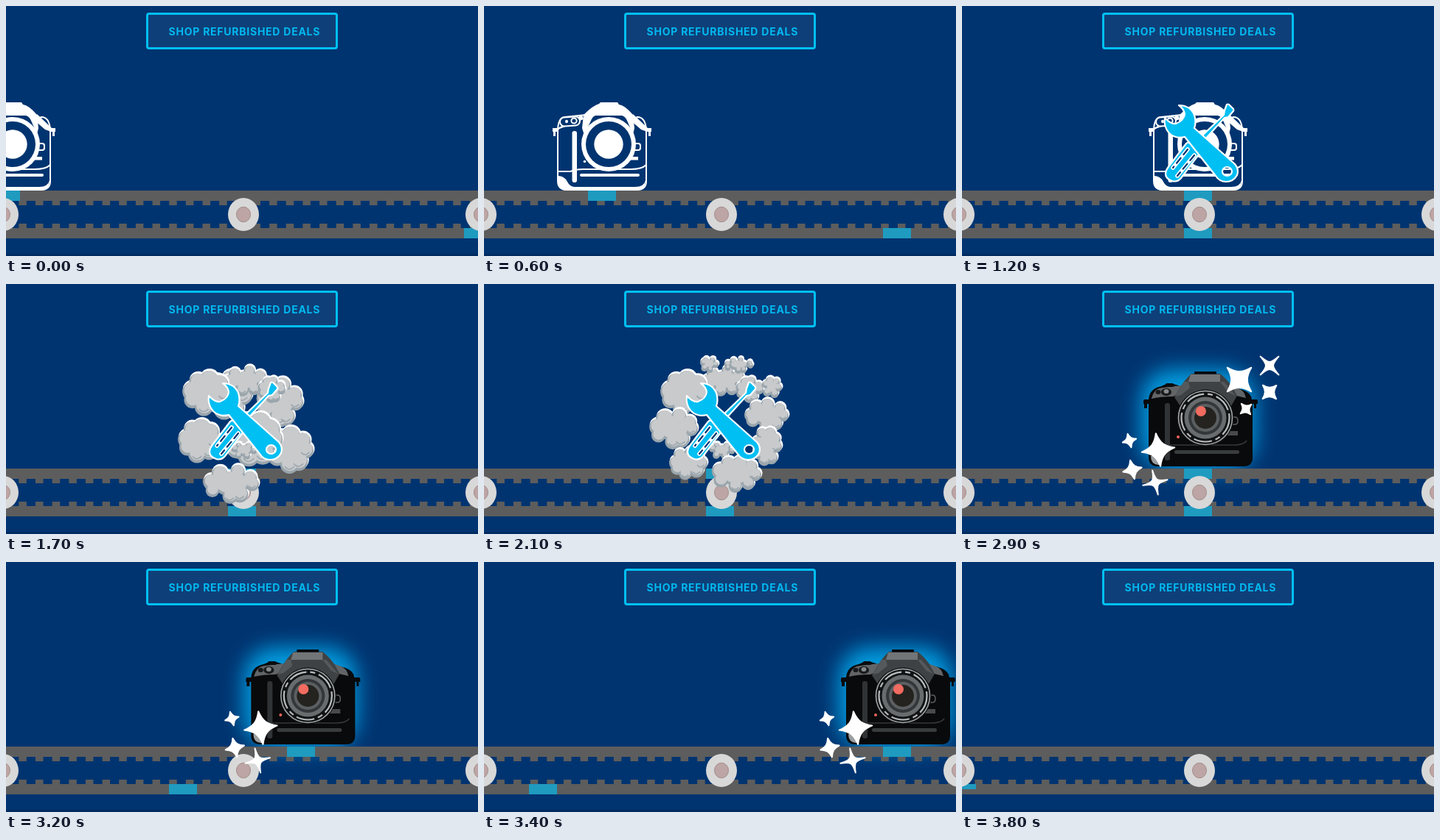
An HTML page for the animation above (4 s loop, 640x340 px).

```html
<!DOCTYPE html>
<html lang="en">
<head>
<meta charset="utf-8">
<title>Refurbished deals</title>
<style>
html, body { margin: 0; width: 100%; height: 100%; overflow: hidden; background: #003470; }
svg { display: block; width: 640px; height: 340px; }
.label { font: 700 14px Inter, Roboto, sans-serif; letter-spacing: .75px; fill: #00b9f0; }
.line { fill: none; stroke: #fff; stroke-width: 2; }
.tool { fill: #00bff3; stroke: #fff; stroke-width: 2.2; stroke-linejoin: round; }
.navy { fill: #003470; }
</style>
</head>
<body>
<svg viewBox="0 0 640 340">
  <defs>
    <filter id="blur" x="-50%" y="-50%" width="200%" height="200%"><feGaussianBlur stdDeviation="14"/></filter>
  </defs>
  <rect class="navy" width="640" height="340"/>
  <rect y="337" width="640" height="3" fill="#002b61"/>
  <rect x="191.5" y="10.5" width="257" height="47" rx="2.5" fill="#0f3f78" stroke="#00c0f3" stroke-width="3"/>
  <text class="label" x="323.4" y="39.6" text-anchor="middle">SHOP REFURBISHED DEALS</text>

  <!-- worn camera, drawn around x = 160 -->
  <g id="oldCam">
    <path class="line" d="M100 171V238Q100 250 113 250H207Q220 250 220 238V169Q219 151 208 151L200 154M100 171Q100 151 110 151L138 148"/>
    <path fill="#fff" d="M100 231Q109 231 113 239Q116 245 122 246H205Q217 246 219 237Q219 251 207 251H113Q100 251 100 238Z"/>
    <path class="line" stroke-width="1.5" d="M100 225H117Q124 222 134 222H199Q214 222 220 216"/>
    <path fill="#fff" d="M93 166h7l33-18 2 6-27 11q-8 2-8 6h-3v6h-3v-6h-1zM227 166h-5l-20-19-3 9 14 12q8 3 8 3h2v6h3v-6h1z"/>
    <path fill="#fff" d="M156 133l2-2h23l2 3q8 1 19 14l2 18-6 26h-57l-8-26 2-18q13-13 21-15z"/>
    <path class="navy" d="M151 149h36q5 1 8 9l7 17-4 20h-58l-4-20 8-17q3-8 7-9z"/>
    <rect x="103" y="151" width="27" height="12" rx="6" class="line navy" transform="rotate(-4 116 157)"/>
    <ellipse cx="112" cy="157" rx="2" ry="2.3" fill="#fff"/>
    <circle cx="122" cy="156" r="3.6" class="line"/>
    <circle cx="169" cy="188" r="37" fill="#fff"/>
    <circle cx="169" cy="188" r="31" class="navy"/>
    <circle cx="169" cy="188" r="19.7" fill="#fff"/>
    <rect x="119.5" y="170" width="6.5" height="70" rx="3" fill="#fff"/>
    <rect x="130" y="228" width="81" height="4" rx="2" fill="#fff"/>
    <path class="line" stroke-width="1.5" d="M204 187h5q3 0 3 3v3q0 3-3 3h-5"/>
    <path fill="#fff" d="M200 205h9v4.500h-12z"/>
    <circle cx="136.500" cy="211.500" r="1.800" fill="#fff"/>
  </g>

  <!-- renewed camera, drawn around x = 320 -->
  <g id="newCam">
    <rect id="glow" x="243" y="116" width="154" height="137" rx="42" fill="#00a8ec" opacity=".9" filter="url(#blur)"/>
    <path fill="#090a0b" d="M246 159q0-2 2-2h5q1-15 17-18l7-3h10l10 3h67l17 5q11 4 12 13h6q2 0 2 2v4h-2v6h-3v-6h-2v73q0 12-12 12H266q-13 0-13-12v-73h-2v6h-4v-6h-1z"/>
    <path fill="#626567" d="M257 156q3-14 15-15l25-3 6 8-17 7q-17 0-29 3zM358 136l17 6q8 3 10 13l-17-4z"/>
    <ellipse cx="266" cy="147" rx="3.500" ry="3" fill="#17191a"/>
    <ellipse cx="277" cy="147" rx="7" ry="5" fill="#17191a"/>
    <ellipse cx="277" cy="146" rx="3.500" ry="3" fill="#85898b"/>
    <rect x="276" y="135" width="11" height="5" rx="1.500" fill="#0c0d0e"/>
    <path fill="#3f4244" d="M311 122h39q9 7 16 17l7 13-8 14h-69l-8-12 7-12q7-12 16-20z"/>
    <path fill="#727577" d="M310 123h40v10h-43z"/>
    <path fill="#55595b" d="M307 133h-6l-12 20 8-2 12-10zM350 133h5l16 19-9-4z"/>
    <rect x="315" y="119" width="30" height="3.500" rx="1" fill="#060708"/>
    <rect x="275" y="162" width="7" height="78" rx="3" fill="#303335"/>
    <path fill="none" stroke="#35383a" stroke-width="1.500" d="M254 220h22q8-1 13-1h79q14 0 18-6"/>
    <rect x="288" y="226" width="88" height="5" rx="2.500" fill="#393c3e"/>
    <path fill="#484b4d" d="M363 200h11v6h-15z"/>
    <path fill="none" stroke="#5c6062" stroke-width="1.500" d="M364 181h6q4 0 4 5t-4 5h-6"/>
    <path fill="#9b9fa1" d="M256 234q8-1 11 6l3 6h-4q-10-1-10-12z"/>
    <circle cx="293" cy="208" r="2" fill="#ef655c"/>
    <circle cx="330" cy="182" r="38.500" fill="#111314"/>
    <circle cx="330" cy="182" r="36.500" fill="none" stroke="#a7abad" stroke-width="1.500"/>
    <circle cx="330" cy="182" r="32.500" fill="none" stroke="#b9bdbf" stroke-width="2.200" stroke-dasharray="25 5 7 5"/>
    <circle cx="330" cy="182" r="28.500" fill="#686c6e"/>
    <circle cx="330" cy="182" r="23" fill="#343739"/>
    <circle cx="330" cy="182" r="19" fill="#5b5f61"/>
    <circle cx="330" cy="182" r="15" fill="#25231f"/>
    <circle cx="324" cy="173" r="7" fill="#f26b60"/>
  </g>

  <g id="belt"></g>
  <rect id="padTop" y="251" width="38" height="14" fill="#1f9bc0"/>
  <rect id="padLow" y="302" width="38" height="14" fill="#1f9bc0"/>
  <g id="rollers"></g>

  <g id="smokeA"></g>
  <g id="smokeB"></g>
  <g id="smokeC"></g>

  <g id="tools">
    <path class="tool" d="M356 142l3-8q1-1 3 0l6 6q1 2-1 4l-6 7-5 1-28 31-5-4 32-31z"/>
    <path class="tool" d="M304 187q3-3 7 0l9 8q3 3 1 7l-24 32q-5 6-12 4-9-3-9-10 0-4 3-8z"/>
    <g fill="none" stroke-linecap="round">
      <path id="slots" stroke="#fff" stroke-width="5.500" d="M306 195l-20 25M315 203l-23 28"/>
      <path stroke="#003470" stroke-width="2.200" stroke-dasharray="9 6" d="M306 195l-20 25M315 203l-23 28"/>
    </g>
    <path class="tool" fill-rule="evenodd" d="M294 135Q309 135 315 148Q318 158 315 166L370 215Q376 222 373 230Q368 239 358 239Q349 239 344 231L302 178Q289 181 281 173Q273 164 275 152Q283 161 290 160Q301 156 302 147Q301 140 294 135ZM353 225a6.500 6 0 1 0 13 0a6.500 6 0 1 0 -13 0Z"/>
  </g>

  <g id="starsR" fill="#fff"></g>
  <g id="starsL" fill="#fff"></g>
</svg>
<script>
const $ = id => document.getElementById(id);
const show = (id, on) => $(id).setAttribute('visibility', on ? 'visible' : 'hidden');
const move = (id, dx) => $(id).setAttribute('transform', `translate(${dx} 0)`);
const rect = (x, y, w, h) => `<rect x="${x}" y="${y}" width="${w}" height="${h}"/>`;

function belt() {
  let s = rect(0, 251, 640, 14) + rect(0, 302, 640, 14);
  for (let x = 40 - 2 * 22.65; x < 640; x += 22.65) {
    s += rect(x, 264, 10.5, 7) + rect(x, 296, 10.5, 7);
  }
  return `<g fill="#5d5d5d">${s}</g>`;
}

const roller = x =>
  `<ellipse cx="${x}" cy="283.500" rx="21" ry="22.500" fill="#d8d8d8"/>
   <ellipse cx="${x}" cy="283.500" rx="9.500" ry="10.300" fill="#bca5a4" stroke="#a38c8c"/>`;

function random(seed) {
  return () => (seed = seed * 16807 % 2147483647) / 2147483647;
}

// Billowing cloud: lobes around an ellipse in white, shade and light layers.
function cloud([x, y, rx, ry], i) {
  const rnd = random(977 * (i + 3));
  const n = rx > 18 ? 8 : 6, lobes = [[x, y, rx * .62, ry * .62]];
  for (let k = 0; k < n; k++) {
    const a = (k + rnd() * .5) / n * 2 * Math.PI, r = Math.min(rx, ry) * (.34 + rnd() * .1);
    lobes.push([x + Math.cos(a) * (rx - r), y + Math.sin(a) * (ry - r), r, r]);
  }
  const layer = (dx, dy, grow, color) => `<g fill="${color}">` + lobes.map(([cx, cy, a, b]) =>
    `<ellipse cx="${cx + dx}" cy="${cy + dy}" rx="${Math.max(1, a + grow)}" ry="${Math.max(1, b + grow)}"/>`).join('') + '</g>';
  const curls = lobes.slice(1, 4).map(([cx, cy, r]) =>
    `<path d="M${cx - r * .5} ${cy + r * .3}q${r * .4} ${r * .6} ${r} 0" fill="none" stroke="#9aa5ac" stroke-width="1.500"/>`).join('');
  return layer(1, -1.5, .5, '#fff') + layer(0, 1, 0, '#9aa5ac') + layer(.5, -1, -1.8, '#c8cacc') + curls;
}

// Four-pointed sparkle; k and j set how far the sides curve in.
function star([x, y, r, turn, thin]) {
  const [k, j] = thin ? [.15, .06] : [.4, .16];
  let d = `M${r} 0`;
  for (let i = 0; i < 4; i++) {
    const c = Math.round(Math.cos(i * Math.PI / 2)), s = Math.round(Math.sin(i * Math.PI / 2));
    const p = (u, v) => `${r * (u * c - v * s)} ${r * (u * s + v * c)}`;
    d += `C${p(k, j)} ${p(j, k)} ${p(0, 1)}`;
  }
  return `<path d="${d}Z" transform="translate(${x} ${y}) rotate(${turn})" stroke="#fff" stroke-width="2" stroke-linejoin="round"/>`;
}

const fill = (id, list, draw) => { $(id).innerHTML = list.map(draw).join(''); };
$('belt').innerHTML = belt();
fill('rollers', [-4, 322, 644], roller);
fill('smokeA', [[300, 150, 34, 34], [371, 160, 32, 34], [263, 213, 30, 30],
  [385, 225, 32, 32], [335, 210, 40, 38], [305, 271, 38, 27]], cloud);
fill('smokeB', [[325, 131, 30, 21], [360, 143, 19, 18], [273, 148, 34, 31], [322, 226, 18, 12]], cloud);
fill('smokeC', [[305, 109, 13, 11], [345, 110, 20, 11], [390, 140, 14, 15], [383, 178, 30, 23],
  [383, 220, 21, 27], [257, 196, 33, 28], [277, 243, 26, 23], [342, 258, 34, 25]], cloud);
fill('starsR', [[376, 130, 23, 45], [417, 111, 17.5, 45, true], [417, 147, 13, 46], [385, 170, 9.5, 50]], star);
fill('starsL', [[266, 225.500, 22.5, 82], [227, 213, 9.5, 75], [231, 252.500, 13, 77], [262, 270, 17, 77, true]], star);

function draw(t) {
  const within = (a, b) => t >= a && t < b;
  const leave = Math.max(0, Math.floor((t - 3100) / 100));
  const top = 80 * (Math.min(4, Math.floor(t / 300)) + leave);
  const low = t < 300 ? 640 : t < 900 ? 560 : t < 1200 ? 396 : Math.max(0, 320 - 80 * leave);
  const ride = leave * 238 / 3;

  $('padTop').setAttribute('x', top - 19);
  $('padLow').setAttribute('x', low - 19);
  $('padLow').setAttribute('height', t < 3600 ? 14 : 7);
  move('oldCam', top - 160);
  move('newCam', ride);
  move('starsL', ride);

  show('oldCam', t < 1700);
  show('tools', within(1200, 2300));
  show('smokeA', within(1500, 2100));
  show('smokeB', within(1700, 2300));
  show('smokeC', within(1900, 2700));
  show('newCam', within(2300, 3800));
  show('glow', within(2500, 3800));
  show('starsR', within(2700, 3100));
  show('starsL', within(2900, 3800));
}

const start = performance.now();
function tick() {
  draw((performance.now() - start) % 4000);
  requestAnimationFrame(tick);
}
tick();
</script>
</body>
</html>
```
